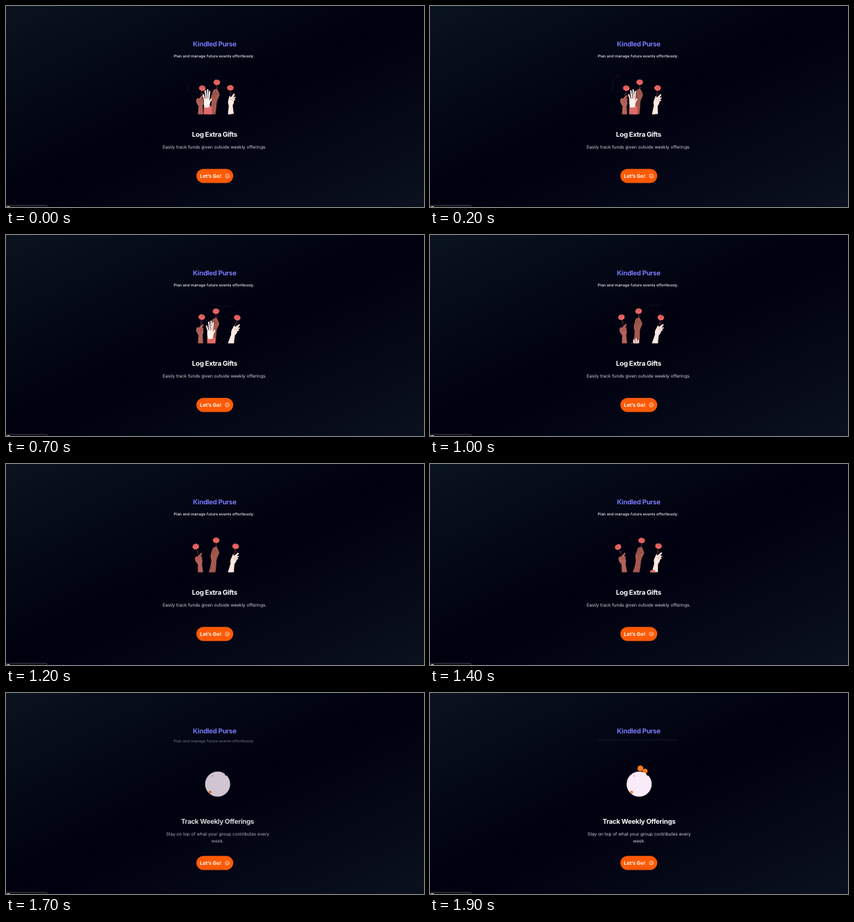
An HTML page for the animation above (2 s loop, 600 by 289 pixels).

```html
<!DOCTYPE html>
<html lang="en">
<head>
<meta charset="utf-8">
<title>Kindled Purse</title>
<style>
  html, body { margin: 0; width: 100%; height: 100%; overflow: hidden; background: #00000f; }
  svg { display: block; width: 100%; height: 100%; }
  text { font-family: Inter, "Open Sans", sans-serif; text-anchor: middle; text-rendering: geometricPrecision; }
  .head { font-size: 9.6px; font-weight: 700; letter-spacing: -.025em; }
  .body { font-size: 6.4px; fill: #d1d5db; }
  .line { fill: none; stroke-linecap: round; stroke-linejoin: round; }
</style>
</head>
<body>
<svg viewBox="0 0 600 289" preserveAspectRatio="none">
  <defs>
    <linearGradient id="sky" gradientUnits="userSpaceOnUse" x1="160" y1="-146" x2="440" y2="435">
      <stop offset="0" stop-color="#0c1822"/>
      <stop offset=".5" stop-color="#00000f"/>
      <stop offset="1" stop-color="#0d1522"/>
    </linearGradient>
    <linearGradient id="ink" gradientUnits="userSpaceOnUse" x1="266" y1="0" x2="333" y2="0">
      <stop offset="0" stop-color="#6d74f4"/>
      <stop offset="1" stop-color="#7f7bf8"/>
    </linearGradient>
    <clipPath id="floor"><rect x="240" y="85" width="120" height="70.8"/></clipPath>
    <g id="rose">
      <path class="line" d="M0 1V-12M0-6l2-1.6" stroke="#7d3838" stroke-width=".7"/>
      <path d="M-1.6-11.2Q-4.6-11.4-4.4-14Q-5.6-16-3.4-17Q-2.4-19.4 0-18.2Q2.6-19.4 3.4-17Q5.6-16.2 4.4-14Q4.4-11.2 1.6-11.2Q0-9.8-1.6-11.2Z" fill="#ea6662"/>
      <path class="line" d="M-2.4-15.6Q0-13.4 2.4-15.8M-1-17Q.4-15.8 1.4-17" stroke="#b9484a" stroke-width=".5"/>
    </g>
  </defs>

  <rect width="600" height="289" fill="url(#sky)"/>
  <text class="head" x="299.5" y="58" fill="url(#ink)">Kindled Purse</text>
  <text id="sub" x="298.6" y="73.6" font-size="5.6" font-weight="500" fill="#e5e7eb">Plan and manage future events effortlessly.</text>

  <g id="gifts">
    <g clip-path="url(#floor)">
      <path id="trail" class="line" pathLength="100" stroke="#1b1c25" stroke-width=".7"
        d="M262 123Q260 99 276 98Q292 94 294 101Q289 106 291 99Q303 100 312 104Q318 101 314 99Q322 107 334 96"/>
      <g id="left">
        <g id="leftRose"><use href="#rose"/></g>
        <path fill="#b4625a" d="M-3.6 0L-2.6-12Q-6.5-17-6-21L-4-24Q-2-22-1-24L3.4-28Q5-28 4.6-26.5L2.5-22.5L4.6-22.5Q5.4-21.5 3.6-20L4.4-18.5Q4.6-15 3.2-12L4 0Z"/>
        <path class="line" stroke="#7e403c" stroke-width=".5" d="M-3.6-20L0-18.6M2.2-22L-.6-20.6M3.4-19.6L.4-17.6"/>
      </g>
      <g id="mid">
        <g transform="translate(6 -34) rotate(3)"><use href="#rose" transform="translate(0 2.4)"/></g>
        <path fill="#a4594f" d="M-5 0Q-1.5-10-1-18Q-3-24-.5-29L1-34Q2-36 4-36.5L7-37Q8.5-34 10-31Q11.5-28 9.5-25Q7-21 6.5-17Q6-8 4.5 0Z"/>
        <path class="line" stroke="#6e3832" stroke-width=".6" d="M4-35.4Q3.4-31 5.4-28.6Q8-28 8.4-30.4M1.4-32Q1-27 3.4-24.6"/>
      </g>
      <g id="right">
        <g transform="translate(6 -23) rotate(13)"><use href="#rose"/></g>
        <path fill="#ffe9e1" d="M-3.6 0Q-.5-9 1-13Q0-18 3-22L5-26Q6.5-26 6.2-23.5L12-28Q14-28 13-26L10.5-23.5L13.6-23Q14-21.5 11-21L12.4-19Q11-18 10-18Q9-14 6.5-12Q5.5-6 5.2 0Z"/>
        <path class="line" stroke="#c4948c" stroke-width=".5" d="M5-21L8-19.6M10-22.6L7.4-21.4M10.6-20.6L8-18.4"/>
      </g>
      <g id="open">
        <path fill="#e06c69" d="M-5.4 30L-4.6-2Q0 .6 4.4-2.4L7 0L6 30Z"/>
        <path fill="#fff1ec" d="M-3.8 0Q-5.4-7-4.2-12Q0-14 3.6-11Q5-6 3.4-.6Q0 1.4-3.8 0Z"/>
        <path class="line" stroke="#fff1ec" stroke-width="2" d="M-3.2-10L-5.4-18M-1.2-11L-2.4-23.4M.9-11L.9-25M2.6-10L3.8-22.4M2.6-5L6-11.6"/>
        <path class="line" stroke="#6e3832" stroke-width=".4" d="M-2.2-12L-3.2-16M-.2-12L-.4-17M1.8-12L2.2-16"/>
      </g>
      <path id="next" fill="#e06c69" d="M-4.6 8V2Q-3.6-1.6-1-1.4Q2-2.6 3.6 0Q4.6 2 4 8Z"/>
    </g>
    <text class="head" x="299.5" y="188" fill="#fff">Log Extra Gifts</text>
    <text class="body" x="299.6" y="205.2">Easily track funds given outside weekly offerings.</text>
  </g>

  <g id="weekly">
    <g id="coins" fill="#fb7a1e">
      <circle cx="302" cy="108.4" r="4.1"/>
      <circle cx="308.8" cy="112.2" r="3.5"/>
    </g>
    <circle cx="300.2" cy="131" r="18" fill="#faebf8"/>
    <circle cx="312.4" cy="117" r="1.8" fill="#05060f"/>
    <circle cx="293" cy="119.2" r=".6" fill="#3b3350"/>
    <path d="M287.2 142.6a2.2 2.2 0 1 1 4 1.2l-1.8 1.2z" fill="#ee8240"/>
    <text class="head" x="300" y="188" fill="#fff">Track Weekly Offerings</text>
    <text class="body" x="300.2" y="205.2">Stay on top of what your group contributes every</text>
    <text class="body" x="300.2" y="215.2">week.</text>
  </g>

  <rect x="273.2" y="234.3" width="53" height="20.2" rx="10.1" fill="#ff5a05"/>
  <text x="293.7" y="247.1" font-size="7.2" font-weight="700" fill="#fff">Let’s Go!</text>
  <g class="line" stroke="#fff" stroke-width=".65">
    <circle cx="317.7" cy="244.4" r="2.9"/>
    <path d="M316.4 245.2q1.3 1.5 2.6 0M316.7 243.4v.05M318.7 243.4v.05"/>
  </g>
  <rect y="286.6" width="59" height="4" rx="1" fill="#0d0f14" stroke="#5a5d66" stroke-width=".6"/>
  <rect x="1.5" y="288" width="4" height="1" fill="#e8e8e8"/>
</svg>
<script>
  const LOOP = 2000, STEP = 100;
  const $ = id => document.getElementById(id);
  const move = (id, x, y, turn = 0) =>
    $(id).setAttribute('transform', `translate(${x} ${y}) rotate(${turn})`);
  const fade = (id, o) => $(id).setAttribute('opacity', o);

  // Linear value at t through [time, value] pairs.
  function at(t, ...keys) {
    if (t <= keys[0][0]) return keys[0][1];
    for (let i = 1; i < keys.length; i++) {
      const [a, u] = keys[i - 1], [b, v] = keys[i];
      if (t <= b) return u + (v - u) * (t - a) / (b - a);
    }
    return keys[keys.length - 1][1];
  }

  function pose(t) {
    move('left', 279, 156, at(t, [700, 0], [1000, -3], [1400, -7]));
    move('leftRose', 0, -23.5, at(t, [0, 11], [400, 11], [700, 8], [1000, -9], [1400, -18]));
    move('mid', 296, 156, at(t, [0, 0], [400, -4], [700, -1.5], [1000, -4], [1400, 1.5]));
    move('right', 322, 156, at(t, [0, -14], [400, 0], [700, 1], [1000, 0], [1400, -5]));
    move('open',
      at(t, [0, 288.5], [400, 293], [700, 293.5], [1000, 295]),
      at(t, [0, 145.5], [400, 145.5], [700, 149], [1000, 174.5], [1200, 186]));
    move('next', 320, at(t, [1200, 158], [1400, 154], [1500, 151]));

    const head = at(t, [0, 8], [400, 46], [700, 92], [1000, 106]);
    const tail = Math.max(0, head - 34);
    $('trail').setAttribute('stroke-dasharray', `0 ${tail} ${Math.max(0, head - tail)} 200`);
    fade('trail', t < 1100 ? 1 : 0);
  }

  function draw(t) {
    pose(t);
    move('gifts', at(t, [1400, 0], [1500, -8]), 0);
    fade('gifts', t >= 1600 ? 0 : at(t, [1400, 1], [1500, .4]));
    move('weekly', at(t, [1600, 10], [1700, 3.6], [1800, .8], [1900, 0]), 0);
    fade('weekly', t < 1600 ? 0 : at(t, [1600, .52], [1700, .84], [1800, .97], [1900, 1]));
    move('coins', 0, at(t, [1600, 13], [1900, 0]));
    move('sub', 0, at(t, [1400, 0], [1600, -1.2], [1900, -4.2]));
    fade('sub', at(t, [1400, 1], [1600, .6], [1900, .08]));
  }

  // The picture advances ten times a second.
  function tick(now) {
    draw(Math.floor(now % LOOP / STEP) * STEP);
    requestAnimationFrame(tick);
  }
  draw(0);
  requestAnimationFrame(tick);
</script>
</body>
</html>
```
